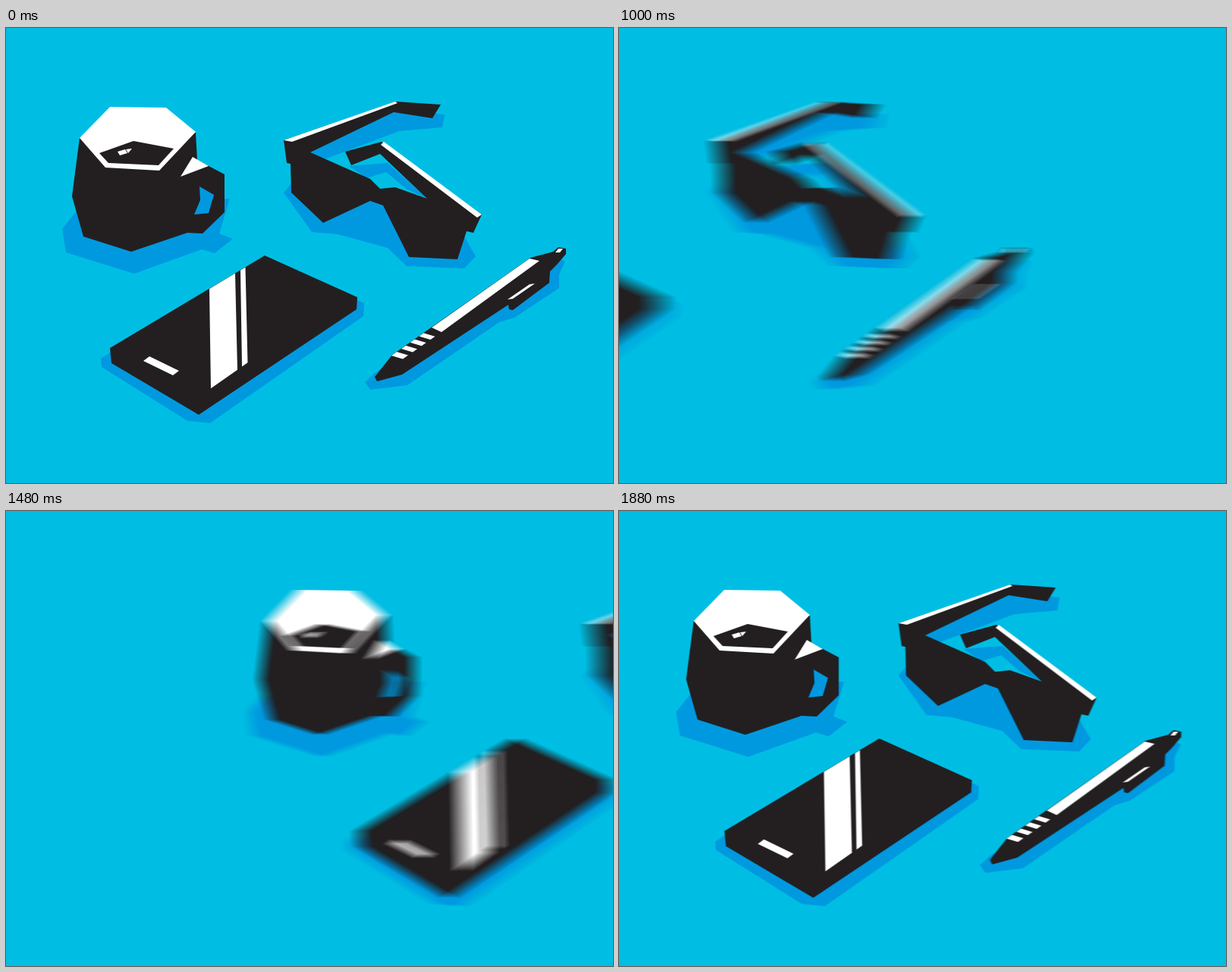
An HTML page with a canvas that plays this animation: 800x600 px, repeating every 1920 ms.

```html
<!DOCTYPE html>
<html>
<head>
<meta charset="utf-8">
<style>
html, body { margin: 0; height: 100%; overflow: hidden; background: #00bee3; }
canvas { display: block; }
</style>
</head>
<body>
<canvas id="stage" width="800" height="600"></canvas>
<script>
const LOOP = 1920, STEP = 40, SHUTTER = 20, SAMPLES = 16;
const BG = '#00bee3', SHADE = '#0099e0', INK = '#231f20', WHITE = '#fff';

const shape = (color, ...outlines) =>
  ({ color, path: new Path2D(outlines.map(o => `M${o}Z`).join('')) });

// Parallelogram from a corner and its two sides
const slab = (x, y, [ax, ay], [bx, by]) =>
  `${x} ${y}l${ax} ${ay} ${bx} ${by} ${-ax} ${-ay}`;

const mug = [
  shape(SHADE, '98 235 74 265 79 296 169 324 258 292 275 297 299 278 281 271 295 225'),
  shape(INK, '97 145 87 222 102 275 165 295 239 270 259 271 288 243 288 193 252 174 250 138'),
  shape(SHADE, '255 209 274 220 267 244 248 246 256 227'),
  shape(WHITE, '137 104 211 105 250 137 202 188 131 184 97 145', '246 170 267 182 230 196'),
  shape(INK, '123 165 168 149 221 159 201 181 135 178'),
  shape(WHITE, slab(147, 163, [10, -3], [3, 5]), '158 160 166 159 161 165')
];

// Reflection on the screen, cut off by its two long edges
const screenTop = x => 344 - 0.6 * (x - 268);
const screenBottom = x => 476 - 0.7 * (x - 269);
const shine = (x, width) => {
  const r = x + width;
  return `${x} ${screenTop(x)} ${r} ${screenTop(r)} ${r + 3} ${screenBottom(r + 3)} ${x + 2} ${screenBottom(x + 2)}`;
};
const phone = [
  shape(SHADE, '137 428 125 436 126 447 239 518 269 521 471 380 472 363 455 355'),
  shape(INK, '137 422 341 300 463 355 462 371 254 510 139 442'),
  shape(WHITE, shine(268, 34), shine(309, 6.5), slab(189, 433, [39, 19], [-8, 6]))
];

const glasses = [
  shape(SHADE, '511 108 578 114 575 131 518 136 420 173 395 165',
    '452 182 503 178 555 225 527 212 501 190 475 198',
    '376 205 366 217 403 269 437 272 503 290 528 314 604 317 619 301 604 275 480 220'),
  shape(INK, '366 148 514 97 573 101 562 119 511 111 401 164 480 199 493 212 513 210 555 225 ' +
    '493 166 455 181 447 163 495 150 627 246 616 270 607 268 595 305 531 302 497 234 480 228 ' +
    '418 257 376 217 375 179 370 178'),
  shape(WHITE, '366 148 513 97 516 99 377 150', '498 150 627 246 621 250 494 154')
];

// White band around the barrel, between two distances from its tip end
const band = (from, to) =>
  slab(508 + from, 432 - 0.7 * from, [to - from, -0.7 * (to - from)], [15, 4.5]);
const stripes = [0, 1, 2].map(i => band(13 + 11.7 * i, 19 + 11.7 * i));
const pen = [
  shape(SHADE, '486 455 473 467 480 477 529 471 650 388 670 382 729 343 729 325 737 308 720 300'),
  shape(INK, '486 460 509 431 691 303 721 295 728 289 738 291 738 298 726 312 ' +
    '717 321 716 336 668 372 663 371 662 365 522 457 489 466'),
  shape(WHITE, band(0, 7), ...stripes, '561 395 690 304 703 307 574 401',
    slab(661, 358, [29, -20], [7, -1]), slab(728, 291, [6, 0], [-4, 5]))
];

// start: when it leaves; out: distance left at 800 ms; back: distance right at 1640 ms
const items = [
  { shapes: mug, start: 510, out: 96, back: 95 },
  { shapes: phone, start: 553, out: 80.5, back: 126 },
  { shapes: glasses, start: 634, out: 27, back: 155.5 },
  { shapes: pen, start: 680, out: 14, back: 181 }
];

function offset({ start, out, back }, t) {
  if (t <= start || t >= LOOP) return 0;
  if (t < 1190) return -out * ((t - start) / (800 - start)) ** 2.75;
  return back * ((LOOP - t) / 280) ** 2.13;
}

const ctx = document.getElementById('stage').getContext('2d');
const buffer = new OffscreenCanvas(800, 600);
const pad = buffer.getContext('2d');

function drawScene(t) {
  pad.setTransform(1, 0, 0, 1, 0, 0);
  pad.fillStyle = BG;
  pad.fillRect(0, 0, 800, 600);
  for (const item of items) {
    pad.setTransform(1, 0, 0, 1, offset(item, t), 0);
    for (const { color, path } of item.shapes) {
      pad.fillStyle = color;
      pad.fill(path);
    }
  }
}

// Motion blur: a running average of scenes across the open shutter
function render(now) {
  const t = Math.floor(now % LOOP / STEP) * STEP;
  const count = t <= 480 ? 1 : SAMPLES;
  for (let i = 0; i < count; i++) {
    drawScene(t + SHUTTER * ((i + 0.5) / count - 0.5));
    ctx.globalAlpha = 1 / (i + 1);
    ctx.drawImage(buffer, 0, 0);
  }
}

const begin = performance.now();
function tick() {
  render(performance.now() - begin);
  requestAnimationFrame(tick);
}
tick();
</script>
</body>
</html>
```
